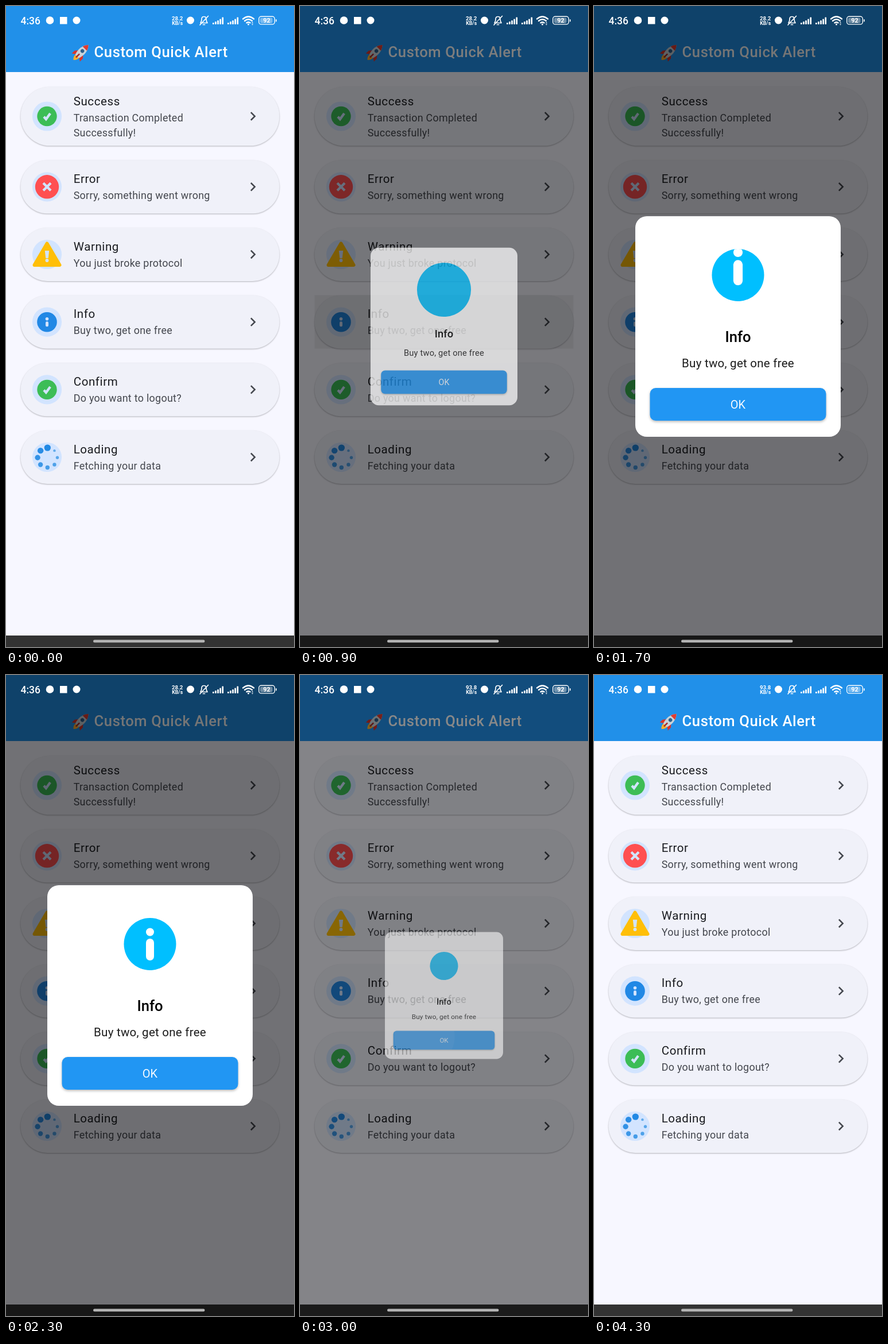
An HTML page for the animation above (4400 ms loop, 502 by 1116 pixels).

```html
<!DOCTYPE html>
<html lang="en">
<head>
<meta charset="utf-8">
<title>Alert demo</title>
<style>
  html, body { margin: 0; width: 100%; height: 100%; overflow: hidden; background: #f7f7ff; }
  svg { display: block; font-family: Roboto, sans-serif; }
  .card { fill: #f0f1f9; filter: drop-shadow(0 1.3px 1.2px rgba(0, 0, 0, .28)); }
  .title { font-size: 20.5px; letter-spacing: .6px; fill: #1a1c20; }
  .sub { font-size: 17.9px; letter-spacing: .29px; fill: #44474e; }
  .cut { fill: #d2e4ff; }
  .cutline { fill: none; stroke: #d2e4ff; stroke-width: 4.3; }
  .mid { text-anchor: middle; }
  .button { fill: #2196f3; filter: drop-shadow(0 2px 2px rgba(0, 0, 0, .28)); }
  .line { fill: none; stroke: #fff; stroke-width: 1.7; stroke-linecap: round; stroke-linejoin: round; }
</style>
</head>
<body>
<svg width="502" height="1116" viewBox="0 0 502 1116">
  <defs>
    <clipPath id="disc"><circle cx="251" cy="468.5" r="45.5"/></clipPath>
    <clipPath id="buttonClip"><rect x="97.5" y="665" width="307" height="57" rx="10"/></clipPath>
  </defs>

  <rect width="502" height="1116" fill="#f7f7ff"/>
  <rect width="502" height="115" fill="#2190e9"/>
  <g transform="translate(131 80.5) rotate(45)">
    <path d="M-4 9Q-5 15 0 19Q5 15 4 9z" fill="#ffb02e"/>
    <path d="M-5 0L-10 6V13L-4 9H4L10 13V6L5 0z" fill="#d9352c"/>
    <path d="M0-18Q10-7 4.500 10H-4.500Q-10-7 0-18z" fill="#c9d3d9"/>
    <path d="M0-18Q4-13.500 5.300-9H-5.300Q-4-13.500 0-18z" fill="#e03c31"/>
    <circle cy="-3" r="3.200" fill="#2d5f8b"/>
    <path d="M-1.200 4H1.200V13H-1.200z" fill="#a82a26"/>
  </g>
  <text x="153.500" y="89" font-size="25.600" font-weight="500" letter-spacing=".6" fill="#fff">Custom Quick Alert</text>
  <g id="cards"></g>
  <rect id="press" x="25.500" y="503.500" width="451" height="93"/>
  <rect y="1096" width="502" height="20" fill="#333"/>

  <rect id="barrier" width="502" height="1116"/>

  <g id="dialog">
    <rect x="72" y="366" width="358" height="384" rx="20" fill="#fff"/>
    <circle id="bubble" cx="251" cy="468.500" fill="#00bfff"/>
    <g clip-path="url(#disc)">
      <g id="mark" fill="#fff">
        <circle cy="-21" r="7"/>
        <rect x="-7" y="-9.500" width="14" height="38" rx="7"/>
      </g>
    </g>
    <text class="mid" x="251" y="585" font-size="25.600" font-weight="500">Info</text>
    <text class="mid" x="251" y="629" font-size="20.500" letter-spacing=".25" fill="#1c1c1c">Buy two, get one free</text>
    <rect class="button" x="97.500" y="665" width="307" height="57" rx="10"/>
    <g clip-path="url(#buttonClip)"><circle id="splash" cx="192" cy="682" fill="#fff"/></g>
    <text class="mid" x="251" y="700.500" font-size="20" fill="#f4f9ff">OK</text>
  </g>

  <g fill="#fff">
    <text x="25.500" y="32" font-size="17.500" font-weight="500">4:36</text>
    <circle cx="76.500" cy="25" r="6.800"/>
    <rect x="94" y="19" width="12.500" height="12.500"/>
    <circle cx="123" cy="25" r="6.500"/>
    <text class="mid" id="speed" x="298.700" y="24.700" font-size="9.700" font-weight="600"></text>
    <text class="mid" x="298.700" y="33" font-size="8.800" font-weight="600">KB/s</text>
    <circle cx="321.500" cy="25" r="6.500"/>
    <path class="line" d="M339 29.500H351Q349 27 349 23Q349 18.500 345 18.500Q341 18.500 341 23Q341 27 339 29.500M343.500 32.500H346.500M338 33L352.500 17.500"/>
    <g id="bars"></g>
    <path class="line" stroke-width="2.400" d="M413 22.500Q422.500 14.500 432 22.500M416 26Q422.500 20.500 429 26M419.500 29.300Q422.500 27 425.500 29.300" style="stroke-width:2.4"/>
    <circle cx="422.500" cy="32" r="1.500"/>
    <path d="M429.500 28l1.500 2h-3zM429.500 33.500l1.500-2h-3z"/>
    <rect class="line" x="440.800" y="18.300" width="27.500" height="13.600" rx="4" style="stroke-width:1.4"/>
    <rect x="443" y="20.500" width="21.500" height="9.200" rx="2" opacity=".4"/>
    <rect x="470" y="23" width="1.700" height="4.500" rx=".8"/>
    <text class="mid" x="454.500" y="29" font-size="10.800" font-weight="600">92</text>
  </g>
  <rect x="152" y="1103.500" width="194.500" height="4.800" rx="2.400" fill="#b4b4b4"/>
</svg>
<script>
const $ = id => document.getElementById(id);
const set = (id, attrs) => {
  for (const name in attrs) $(id).setAttribute(name, attrs[name]);
};
const clamp = x => Math.min(1, Math.max(0, x));

// Card icons, drawn around their own centre
const check = '<circle r="17.2" fill="#3cbd56"/><path class="cutline" d="M-5.500 .8L-1.700 5L5.600-5"/>';
const dots = [...Array(8)].map((_, i) => {
  const a = -Math.PI / 2 - i * Math.PI / 4;
  return `<circle cx="${.8 + 17.2 * Math.cos(a)}" cy="${.8 + 17.2 * Math.sin(a)}"
    r="${5.7 - i * .5}" fill="hsl(208 78% ${51 + i * 2}%)"/>`;
}).join('');
const icons = {
  check,
  cross: '<circle r="20.700" fill="#ff4f51"/><path class="cutline" d="M-6.500-6.500L6.500 6.500M6.500-6.500L-6.500 6.500"/>',
  warning: `<path d="M0-19L22 18.500H-22z" fill="#ffbf08" stroke="#ffbf08" stroke-width="6" stroke-linejoin="round"/>
    <path class="cut" d="M-3.700-6.500H3.700L2.200 6.500H-2.200z"/><circle class="cut" cy="10.500" r="2.900"/>`,
  info: `<circle r="17.300" fill="#2188e5"/><circle class="cut" cy="-5.500" r="2.800"/>
    <rect class="cut" x="-2.500" y="-1" width="5" height="9" rx="2.300"/>`,
  dots
};

const card = (cy, title, lines, icon) => {
  const half = lines.length > 1 ? 51.3 : 46.4;
  const top = lines.length > 1 ? -19 : -7;
  return `<g transform="translate(0 ${cy})">
    <rect class="card" x="25.500" y="${-half}" width="451" height="${2 * half}" rx="${half}"/>
    <g transform="translate(71.500 0)"><circle class="cut" r="25.600"/>${icons[icon]}</g>
    <text class="title" x="117.700" y="${top}">${title}</text>
    ${lines.map((s, i) => `<text class="sub" x="117.700" y="${top + 28.3 + 25.6 * i}">${s}</text>`).join('')}
    <path transform="translate(415 -15.400) scale(1.280)" fill="#44474e"
      d="M10 6L8.590 7.410 13.170 12l-4.580 4.590L10 18l6-6z"/>
  </g>`;
};

$('cards').innerHTML =
  card(192, 'Success', ['Transaction Completed', 'Successfully!'], 'check') +
  card(314.8, 'Error', ['Sorry, something went wrong'], 'cross') +
  card(432.5, 'Warning', ['You just broke protocol'], 'warning') +
  card(550.2, 'Info', ['Buy two, get one free'], 'info') +
  card(667.9, 'Confirm', ['Do you want to logout?'], 'check') +
  card(785.5, 'Loading', ['Fetching your data'], 'dots');

$('bars').innerHTML = [360, 386].map(x => [3, 5, 7, 9.5, 12.5].map((h, i) =>
  `<rect x="${x + 4.1 * i}" y="${32 - h}" width="2.700" height="${h}" rx="1"/>`).join('')).join('');

// cubic-bezier(.25, .1, .25, 1)
function ease(x) {
  let lo = 0, hi = 1, s;
  for (let i = 0; i < 20; i++) {
    s = (lo + hi) / 2;
    if (.75 * s * (1 - s) + s ** 3 < x) lo = s; else hi = s;
  }
  return .3 * s * (1 - s) ** 2 + 3 * s * s * (1 - s) + s ** 3;
}

const LOOP = 4400, OPEN = 758, CLOSE = 2922, ICON_LOOP = 2176;

function bubbleRadius(p) {
  if (p < 150) return 66 * Math.sin(Math.PI / 2 * p / 150);
  return 45.5 + 20.5 * (1 + Math.cos(Math.PI * clamp((p - 150) / 220))) / 2;
}

function draw(t) {
  const shown = t < CLOSE ? clamp((t - OPEN) / 200) : clamp(1 - (t - CLOSE) / 186);
  set('barrier', { opacity: .54 * ease(shown) });
  set('dialog', {
    opacity: shown,
    transform: `translate(251 558) scale(${shown}) translate(-251 -558)`
  });

  const p = Math.max(0, t - OPEN) % ICON_LOOP;
  const fall = (1 - clamp((p - 722) / 530)) ** 3;
  set('bubble', { r: bubbleRadius(p) });
  set('mark', {
    opacity: fall < 1 ? 1 : 0,
    transform: `translate(251 ${468.5 - 65 * fall - 60 * fall * fall}) scale(${1 + .8 * fall})`
  });

  set('press', { opacity: .06 * clamp((t - 640) / 80) * clamp((1100 - t) / 200) });
  const splash = Math.max(0, t - 2860);
  set('splash', { r: splash * .65, opacity: splash ? .06 : 0 });
  $('speed').textContent = t < 2600 ? '28.2' : '93.8';
}

function tick() {
  draw(performance.now() % LOOP);
  requestAnimationFrame(tick);
}
tick();
</script>
</body>
</html>
```
